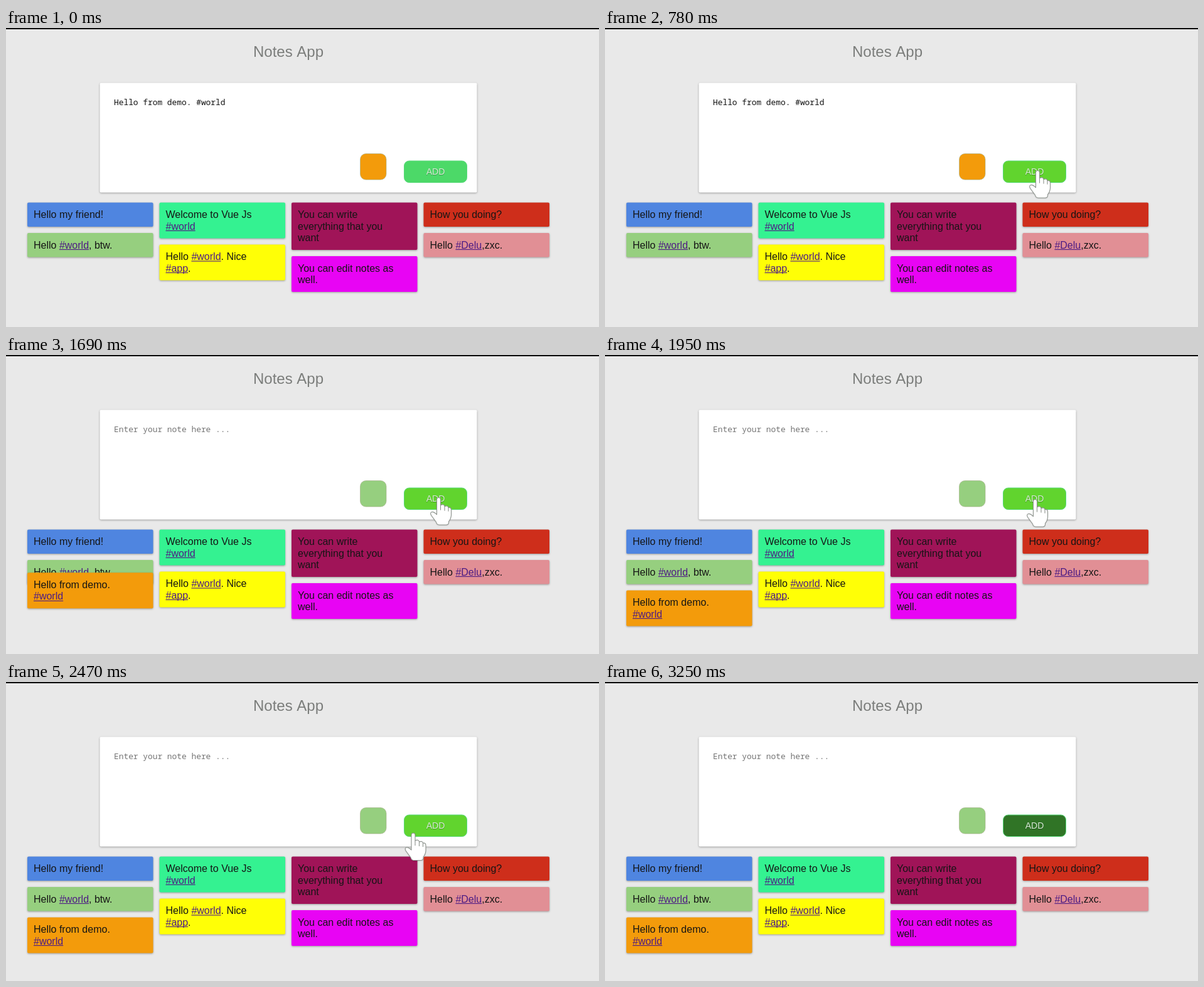
These frames come from a looping animation (945 by 477 pixels, 4.42 s). An HTML page with a canvas:

```html
<!DOCTYPE html>
<html lang="en">
<head>
<meta charset="utf-8">
<title>Notes App</title>
<style>
  html, body { margin: 0; width: 100%; height: 100%; overflow: hidden; background: #e9e9e9; }
  canvas { display: block; }
</style>
</head>
<body>
<canvas id="stage" width="945" height="477"></canvas>
<script>
const ctx = document.getElementById('stage').getContext('2d');
const LOOP = 4420, TICK = 130;
const SANS = '"Liberation Sans", Arial, sans-serif';
const MONO = '"Noto Sans Mono", "DejaVu Sans Mono", monospace';
const ORANGE = '#f39b0b', GREEN = '#96cf7f';
const BOARD = { x: 34, y: 278.5, pitch: 210.5, width: 200.5, gap: 10, pad: 10, line: 18.5 };

const columns = [
  [
    { color: '#4f85e0', lines: ['Hello my friend!'] },
    { color: GREEN, lines: ['Hello #world, btw.'] },
    { color: ORANGE, lines: ['Hello from demo.', '#world'], added: true }
  ], [
    { color: '#34f291', lines: ['Welcome to Vue Js', '#world'] },
    { color: '#ffff06', lines: ['Hello #world. Nice', '#app.'] }
  ], [
    { color: '#a01458', lines: ['You can write', 'everything that you', 'want'] },
    { color: '#e804f4', lines: ['You can edit notes as', 'well.'] }
  ], [
    { color: '#ce2e1b', lines: ['How you doing?'] },
    { color: '#e18f95', lines: ['Hello #Delu,zxc.'] }
  ]
];

const progress = (t, from, to) => Math.min(1, Math.max(0, (t - from) / (to - from)));
const mix = (a, b, u) => a + (b - a) * u;
const mixColor = (a, b, u) => a.map((v, i) => Math.round(mix(v, b[i], u)));

function box(x, y, w, h, r, fill, stroke) {
  ctx.beginPath();
  ctx.roundRect(x, y, w, h, r);
  ctx.fillStyle = fill;
  ctx.fill();
  if (stroke) {
    ctx.strokeStyle = stroke;
    ctx.lineWidth = 1;
    ctx.stroke();
  }
}

function withShadow(alpha, blur, paint) {
  ctx.save();
  ctx.shadowColor = `rgba(0,0,0,${alpha})`;
  ctx.shadowBlur = blur;
  ctx.shadowOffsetY = 1;
  paint();
  ctx.restore();
}

function raisedBox(x, y, w, h, fill) {
  withShadow(.34, 3, () => box(x, y, w, h, 2, fill));
}

function label(text, x, y, font, color, align = 'left') {
  ctx.font = font;
  ctx.fillStyle = color;
  ctx.textAlign = align;
  ctx.fillText(text, x, y);
}

function taggedLine(line, x, y) {
  for (const part of line.split(/(#\w+)/)) {
    const tag = part[0] === '#';
    label(part, x, y, '16px ' + SANS, tag ? '#4e1c84' : '#151515');
    const width = ctx.measureText(part).width;
    if (tag) ctx.fillRect(x, y + 1.4, width, 1.1);
    x += width;
  }
}

function drawNotes(t) {
  const saved = t >= 1560;
  const rise = (1 - progress(t, 1500, 1850)) ** 1.58;
  columns.forEach((column, i) => {
    const x = BOARD.x + BOARD.pitch * i;
    let top = BOARD.y;
    for (const { color, lines, added } of column) {
      if (added && !saved) continue;
      const y = added ? mix(top, BOARD.y, rise) : top;
      const height = 2 * BOARD.pad + BOARD.line * lines.length;
      raisedBox(x, y, BOARD.width, height, color);
      lines.forEach((line, n) => taggedLine(line, x + BOARD.pad, y + 24.5 + BOARD.line * n));
      top += height + BOARD.gap;
    }
  });
}

function drawButton(t) {
  const y = t === 1430 ? 213 : 212;
  const hovered = mixColor([76, 217, 104], [97, 212, 46], progress(t, 520, 780));
  const fill = mixColor(hovered, [48, 116, 38], progress(t, 2860, 3250));
  box(634.5, y, 100, 34.5, 8, `rgb(${fill})`, '#58d97a');
  withShadow(.3, 1, () =>
    label('ADD', 684.5, y + 22, '14px ' + SANS, '#d9ecd8', 'center'));
}

const ARROW = new Path2D('M0 0V32L7.5 25.5L13 38L18 35.5L12.5 24H22.5Z');
const HAND = new Path2D('M-3 3Q-3 0 0 0Q3 0 3 3V12Q8.5 9.5 9.5 14Q14.5 12 15.5 16' +
  'Q20 15 20 20V28Q19.5 34 16 38V40Q15.5 43.5 12 43.5H1Q-3 43.5 -4 39' +
  'L-12 28Q-14 24 -11 23Q-8 22 -3 27Z');
const KNUCKLES = new Path2D('M3 12V20M9.5 14V21M15.5 16V22');

function pointerAt(t) {
  const away = 1 - progress(t, 260, 780);
  const nudge = progress(t, 1820, 1950);
  const slide = progress(t, 2080, 2470);
  const leave = progress(t, 2860, 3250);
  return [
    689.5 - 49 * away - 4 * nudge - 36.5 * slide - 90 * leave,
    227.5 + 177 * away ** 2.4 + 3 * nudge + 10.5 * slide + 235 * leave ** 1.3
  ];
}

function drawPointer(t) {
  if (t < 260 || t >= 3250) return;
  const hand = t >= 650 && t < 2990;
  const shape = hand ? HAND : ARROW;
  ctx.save();
  ctx.translate(...pointerAt(t));
  ctx.lineJoin = 'round';
  ctx.lineWidth = 1.1;
  ctx.strokeStyle = hand ? '#8d938d' : '#555';
  ctx.fillStyle = '#fff';
  withShadow(.2, 2, () => ctx.fill(shape));
  ctx.stroke(shape);
  if (hand) ctx.stroke(KNUCKLES);
  ctx.restore();
}

function draw(t) {
  const saved = t >= 1560;
  ctx.fillStyle = '#e9e9e9';
  ctx.fillRect(0, 0, 945, 477);
  ctx.fillStyle = '#000';
  ctx.fillRect(0, 0, 945, 2);

  label('Notes App', 450, 46, '24px ' + SANS, '#7b7d7b', 'center');
  raisedBox(149.5, 87.5, 601, 175, '#fff');
  label(saved ? 'Enter your note here ...' : 'Hello from demo. #world',
    172, 123, '12.87px ' + MONO, saved ? '#757575' : '#111');
  box(564.5, 200.5, 41.5, 41.5, 9, saved ? GREEN : ORANGE, 'rgba(160,170,130,.6)');
  drawButton(t);
  drawNotes(t);
  drawPointer(t);
}

const start = performance.now();
function frame() {
  const t = (performance.now() - start) % LOOP;
  draw(Math.floor(t / TICK) * TICK);
  requestAnimationFrame(frame);
}
frame();
</script>
</body>
</html>
```
